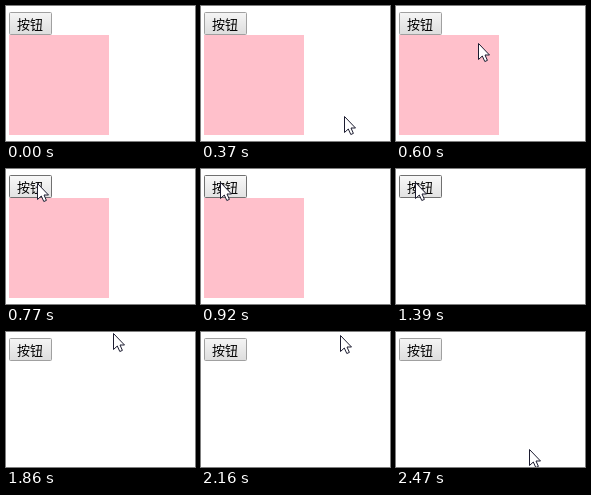
These frames come from a looping animation (189 by 135 pixels, 2.85 s). An HTML page:

```html
<!DOCTYPE html>
<html lang="zh-CN">
<meta charset="utf-8">
<style>
  html, body { margin: 0; width: 100%; height: 100%; overflow: hidden; background: #fff; }
  svg { display: block; width: 189px; height: 135px; }
  text { font: 300 13px "Noto Sans CJK SC", "Noto Sans CJK", sans-serif; }
</style>
<svg viewBox="0 0 189 135">
  <defs>
    <linearGradient id="face" x2="0" y2="1">
      <stop id="top"/>
      <stop id="bottom" offset="1"/>
    </linearGradient>
  </defs>
  <rect id="box" x="3" y="29" width="100" height="100" fill="#ffc0cb"/>
  <rect id="button" x="3.5" y="6.5" width="42" height="22" rx="1" fill="url(#face)"/>
  <text x="11" y="23">按钮</text>
  <path id="cursor" d="M.5.5V16.5L4.3 13 6.8 18.5 9.4 17.4 7 12H11.5Z"
    fill="#fff" stroke="#1c1c30" stroke-linejoin="round"/>
</svg>
<script>
  const LOOP = 2850, STEP = 78;
  const ENTER = 366, PRESS = 1240, RELEASE = 1390, LEAVE = 1860, RETURN = 2160;
  const looks = {
    normal: { top: '#f5f5f5', bottom: '#dddddd', border: '#a0a0a0' },
    hover: { top: '#f9f9f9', bottom: '#e2e2e2', border: '#707070' },
    pressed: { top: '#dcdcdc', bottom: '#f2f2f2', border: '#acacac' }
  };
  const el = id => document.getElementById(id);
  const show = (id, on) => el(id).style.display = on ? '' : 'none';

  // The pointer moves in discrete steps: onto the button, away, then down the right side.
  function pointer(t) {
    const steps = from => Math.floor((t - from) / STEP);
    if (t >= RETURN) {
      const k = steps(RETURN);
      return k < 4 ? [139 + 5.5 * k - 2.5 * k * k, 3 + 38 * k] : null;
    }
    if (t >= LEAVE) return steps(LEAVE) < 1 ? [107, 1] : null;
    if (t < ENTER) return null;
    const rest = 1 - Math.min(1, steps(ENTER) / 7) ** 2;
    return [19 + 124 * rest ** 3.3, 13 + 97 * rest ** 6.9];
  }

  function draw(t) {
    const at = pointer(t)?.map(Math.round);
    const over = at && at[0] < 46 && at[1] < 29;
    const down = t >= PRESS && t < RELEASE;
    const look = looks[down ? 'pressed' : over ? 'hover' : 'normal'];

    el('top').setAttribute('stop-color', look.top);
    el('bottom').setAttribute('stop-color', look.bottom);
    el('button').setAttribute('stroke', look.border);
    show('box', t < RELEASE);
    show('cursor', at);
    if (at) el('cursor').setAttribute('transform', `translate(${at})`);
  }

  const start = performance.now();
  function tick() {
    draw((performance.now() - start) % LOOP);
    requestAnimationFrame(tick);
  }
  tick();
</script>
</html>
```
